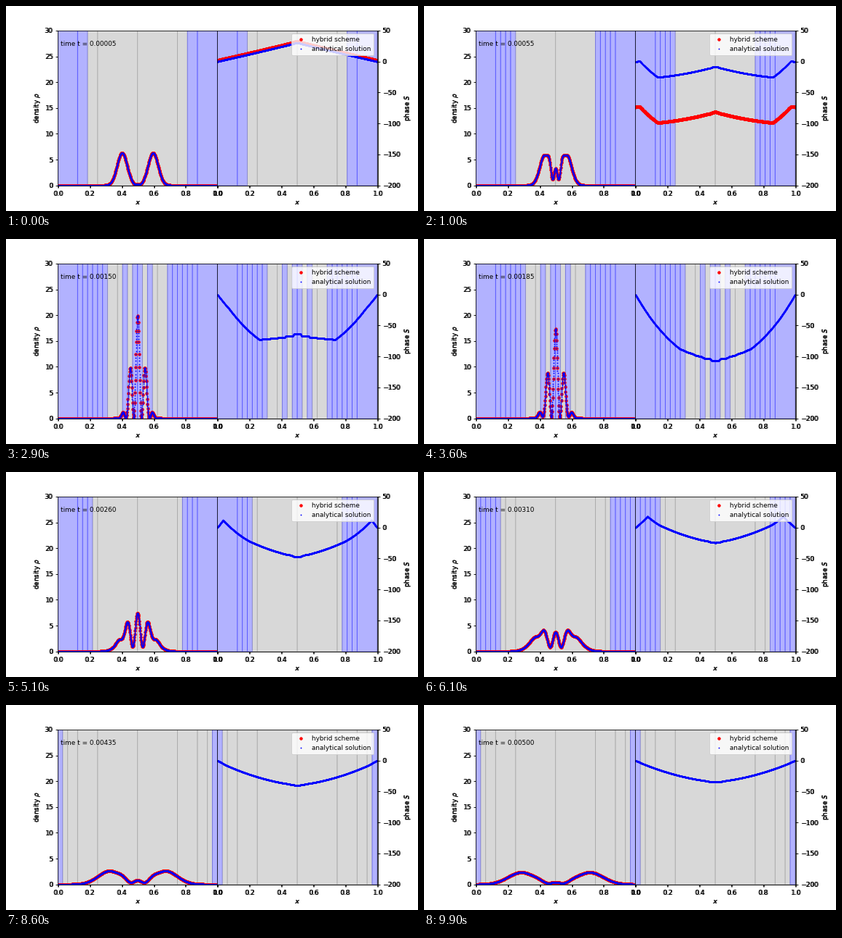
Animation of 566x283 px, one loop 10 s. Source, as a matplotlib script:

```python
import numpy as np
import matplotlib.pyplot as plt
from matplotlib.animation import FuncAnimation

plt.rcParams.update({"font.family": "DejaVu Sans", "font.size": 9,
                     "axes.labelsize": 9, "xtick.labelsize": 9,
                     "ytick.labelsize": 9, "legend.fontsize": 9})

FRAMES, DT = 100, 5e-5
W, H, DPI = 566, 283, 70.75
K, X0, VAR = 62.5, 0.4, 1e-3      # wave number, packet centre, variance
MEET = (0.5 - X0) / K             # time at which the packets coincide
CELLS = 32                        # finest blocks across the domain
SAG = 400                         # curvature of the phase in the vacuum
X = np.linspace(0, 0.5, 1001)     # left half; the rest follows by symmetry
X_ALL = np.concatenate([X, 1 - X[-2::-1]])
STEP = 4                          # coarser sampling of the scheme

# vacuum phase: time in ms, then kink (x, S) and joint with the packet (x, S)
TAIL = np.array([(0.05, .02, 1.2, .04, 2.4),
                 (1.05, .035, 0, .24, -53),
                 (1.85, .1, -40, .28, -88),
                 (2.60, .035, 12, .2, -22),
                 (3.10, .075, 18, .15, 4),
                 (3.80, .03, -4.5, .06, -9.5),
                 (5.00, .02, -2, .04, -4.5)])


def mirror(y):
    return np.concatenate([y, y[-2::-1]])


def wave(t):
    """Two free Gaussian packets running towards each other."""
    spread = 1 + 0.5j * t / VAR

    def packet(x):
        return np.exp(-(x - X0 - K * t) ** 2 / (4 * VAR * spread)
                      + 1j * K * (x - X0))

    psi = packet(X) + packet(1 - X)
    return psi / np.sqrt(spread) * (8 * np.pi * VAR) ** -0.25


def fields(t):
    psi = wave(t)
    phase = np.unwrap(np.angle(psi))
    xk, sk, xj, sj = (np.interp(1e3 * t, TAIL[:, 0], c) for c in TAIL.T[1:])
    start, end = np.where(X < xk, 0, xk), np.where(X < xk, xk, xj)
    tail = np.interp(X, [0, xk, xj], [0, sk, sj]) - SAG * (X - start) * (end - X)
    core = sj + phase - np.interp(xj, X, phase)
    return mirror(np.abs(psi) ** 2), mirror(np.where(X < xj, tail, core))


def tree(b):
    """Edges of the dyadic blocks needed to resolve position b."""
    return {e for n in (1, 2, 4, 8, 16) for e in (b // n * n, -(-b // n) * n)}


def mesh(t):
    """Blocks of the domain: fluid (blue) or wave (gray) regions."""
    sigma = np.sqrt(VAR * (1 + (t / (2 * VAR)) ** 2))
    foot = 0.5 - K * abs(t - MEET) - 4.2 * sigma
    lo = max(1, round(min(CELLS * foot, 6 + 2900 * t)))
    edges = {0} | tree(lo)
    if t > 3e-4:
        edges |= set(range(4 if t < 2.8e-3 else 0, lo))
    # deep interference nodes in the middle are treated as well
    nodes = sum(abs(t - MEET) < span for span in (3e-4, 8e-4))
    if nodes:
        edges |= set(range(15 - nodes, 17)) | tree(15 - nodes)
    inner = {15 - 2 * j for j in range(nodes)}
    edges = sorted(edges | {CELLS - e for e in edges})
    for a, b in zip(edges, edges[1:]):
        left = min(a, CELLS - b)
        yield a / CELLS, b / CELLS, "blue" if left < lo or left in inner else "gray"


def panels(shift=0):
    left, right = fig.subplots(1, 2, gridspec_kw=dict(
        left=(70.95 + shift) / W, right=(509.8 + shift) / W,
        bottom=0.125, top=0.88, wspace=0))
    left.set(xlim=(0, 1), ylim=(0, 30), xlabel="$x$", ylabel=r"density $\rho$")
    right.yaxis.tick_right()
    right.yaxis.set_label_position("right")
    right.set(xlim=(0, 1), ylim=(-200, 50), xlabel="$x$", ylabel="phase $S$")
    return left, right


def curves(ax):
    red, = ax.plot([], [], "o", color="red", ms=3.5, label="hybrid scheme")
    blue, = ax.plot([], [], "o", color="blue", ms=0.9,
                    label="analytical solution")
    return red, blue


fig = plt.figure(figsize=(W / DPI, H / DPI), dpi=DPI)
panels(shift=1)                   # axes underneath give the heavy labels
ax_rho, ax_s = panels()
rho_red, rho_blue = curves(ax_rho)
s_red, s_blue = curves(ax_s)
ax_s.legend(loc="upper right")
clock = ax_rho.text(0.02, 27, "")
spans = []


def draw(i):
    t = (i + 1) * DT
    rho, s = fields(t)
    drift = 2 - 151e3 * (t - DT)
    rho_red.set_data(X_ALL[::STEP], rho[::STEP])
    rho_blue.set_data(X_ALL, rho)
    s_red.set_data(X_ALL[::STEP], s[::STEP] + drift)
    s_blue.set_data(X_ALL, s)
    clock.set_text(f"time t = {t:.5f}")
    while spans:
        spans.pop().remove()
    for a, b, color in mesh(t):
        for ax in (ax_rho, ax_s):
            spans.append(ax.axvspan(a, b, color=color, alpha=0.3, snap=False))
    return [rho_red, rho_blue, s_red, s_blue, clock]


anim = FuncAnimation(fig, draw, frames=FRAMES, interval=100, repeat=True,
                     repeat_delay=0, init_func=lambda: [])
plt.show()
```
